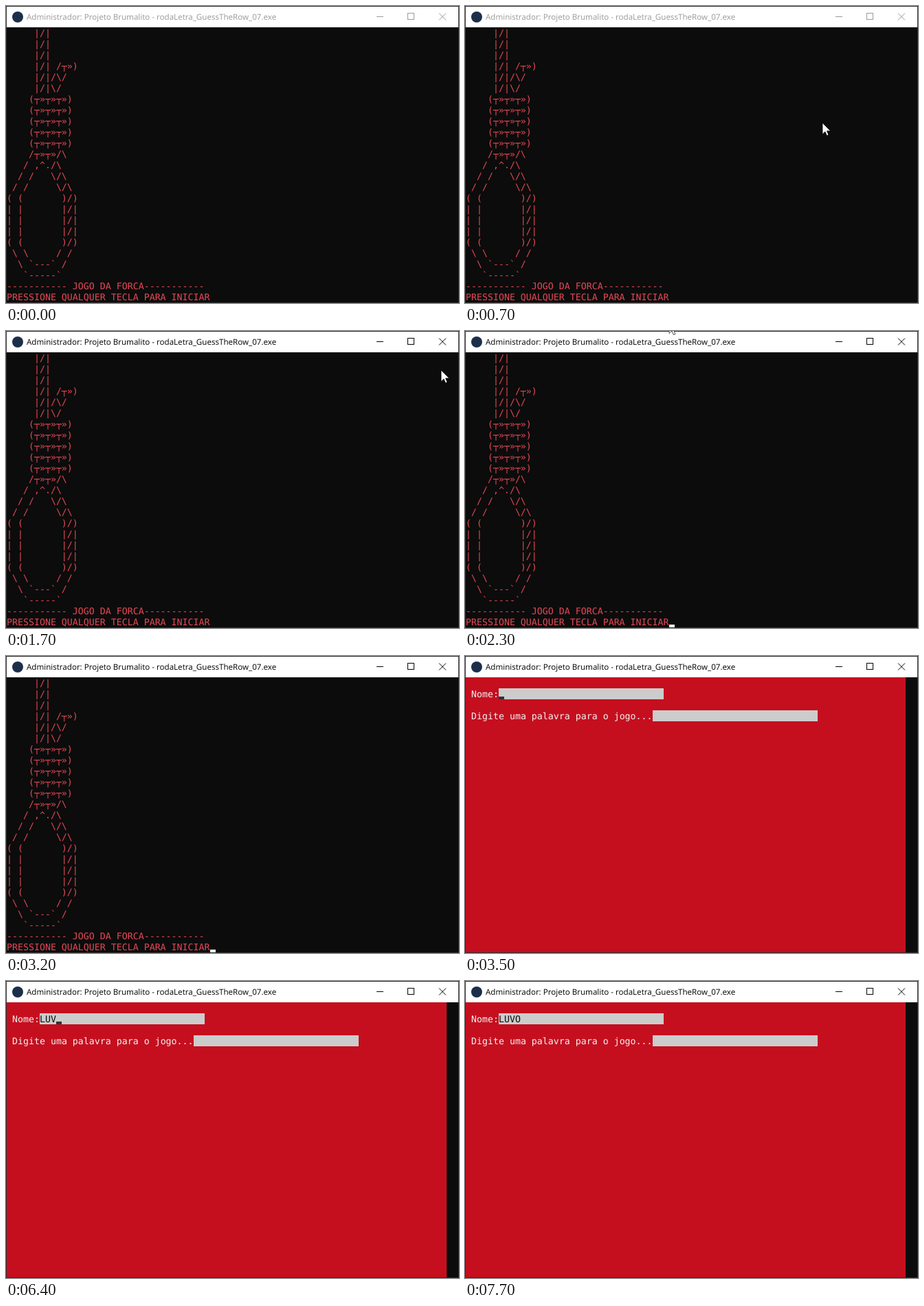
An HTML page that plays this animation: 659 by 432 pixels, repeating every 8 s.

```html
<!DOCTYPE html>
<html lang="pt">
<head>
<meta charset="utf-8">
<title>Jogo da forca</title>
<style>
  html, body { margin: 0; width: 100%; height: 100%; overflow: hidden; background: #0c0c0c; }
  svg { display: block; width: 659px; height: 432px; }
  text { white-space: pre; text-rendering: geometricPrecision; }
  .mono { font: 13.288px "DejaVu Sans Mono", monospace; }
  .title { font: 11.6px "Open Sans", "Noto Sans", sans-serif; }
</style>
</head>
<body>
<svg viewBox="0 0 659 432" xmlns="http://www.w3.org/2000/svg">
  <rect width="659" height="432" fill="#0c0c0c"/>

  <g id="intro" class="mono" fill="#e74856"></g>

  <g id="form" class="mono" fill="#f2f2f2">
    <rect x="1" y="31" width="640" height="400" fill="#c50f1f"/>
    <rect x="49" y="47" width="240" height="16" fill="#ccc"/>
    <rect x="273" y="79" width="240" height="16" fill="#ccc"/>
    <text x="9" y="60">Nome:</text>
    <text x="9" y="92">Digite uma palavra para o jogo...</text>
    <text id="typed" x="49" y="60" fill="#0c0c0c"></text>
  </g>

  <rect id="caret" width="8" height="4"/>

  <rect width="659" height="31" fill="#fff"/>
  <circle cx="17" cy="16" r="8" fill="#1c2f4a"/>
  <g id="bar">
    <text class="title" x="30" y="20">Administrador: Projeto Brumalito - rodaLetra_GuessTheRow_07.exe</text>
    <g fill="none" stroke="currentColor">
      <path d="M539 15.5h10M584.5 10.5h9v9h-9z" shape-rendering="crispEdges"/>
      <path d="M630 10.5l10 10M640 10.5l-10 10"/>
    </g>
  </g>
  <rect x=".5" y=".5" width="658" height="431" fill="none" stroke="#2b2b2b"/>

  <path id="mouse" d="M0 0V16.5L3.9 12.8 6.4 18.5 8.9 17.4 6.5 11.8H11.7Z" fill="#fff" stroke="#000" stroke-width=".7"/>
</svg>

<script>
const LOOP = 8000, CELL = 8, ROW = 16, TOP = 31;
const FORM_AT = 3500, FOCUS_AT = 1400;
const el = id => document.getElementById(id);
const repeat = (line, n) => Array(n).fill(line);

const rope = [
  ...repeat("     |/|", 3),
  "     |/| /┬»)",
  "     |/|/\\/",
  "     |/|\\/",
  ...repeat("    (┬»┬»┬»)", 5),
  "    /┬»┬»/\\",
  "   / ,^./\\",
  "  / /   \\/\\",
  " / /     \\/\\",
  "( (       )/)",
  ...repeat("| |       |/|", 3),
  "( (       )/)",
  " \\ \\     / /",
  "  \\ `---` /",
  "   `-----`",
  "----------- JOGO DA FORCA-----------",
  "PRESSIONE QUALQUER TECLA PARA INICIAR"
];

rope.forEach((line, row) => {
  const text = document.createElementNS("http://www.w3.org/2000/svg", "text");
  text.setAttribute("x", 1);
  text.setAttribute("y", TOP + row * ROW + 13);
  text.textContent = line;
  el("intro").append(text);
});

const NAME = "LUVO";
const keyTimes = [5000, 5200, 6400, 6900];
const NEXT_FIELD_AT = 7500;

// Intervals in which the caret is lit
const caretOn = [
  [2200, 2800], [3200, 3700], [4200, 4700], [5000, 5100], [5200, 5700],
  [6200, 6700], [6900, 7200], [7500, 7700]
];

// Pointer path: time, x, y
const path = [
  [300, 34, 0], [500, 260, 60], [700, 520, 170], [900, 639, 280], [1100, 626, 268],
  [1200, 605, 169], [1300, 605, 169], [1700, 633, 57], [2200, 297, -13], [2500, 296, -13]
];

function pointerAt(t) {
  const i = path.findIndex(p => p[0] > t);
  if (i < 1) return null;
  const [t0, x0, y0] = path[i - 1], [t1, x1, y1] = path[i];
  const k = (t - t0) / (t1 - t0);
  return [x0 + (x1 - x0) * k, y0 + (y1 - y0) * k].map(Math.round);
}

function caretCell(t, count) {
  if (t < FORM_AT) return [37, 24];
  return t < NEXT_FIELD_AT ? [6 + count, 1] : [34, 3];
}

const show = (node, on) => node.setAttribute("visibility", on ? "visible" : "hidden");

function draw(time) {
  const t = Math.floor(time % LOOP / 100) * 100;
  const inForm = t >= FORM_AT;
  const count = keyTimes.filter(k => t >= k).length;

  show(el("intro"), !inForm);
  show(el("form"), inForm);
  el("typed").textContent = NAME.slice(0, count);

  const ink = t < FOCUS_AT ? "#999" : "#000";
  el("bar").setAttribute("fill", ink);
  el("bar").setAttribute("color", ink);

  const caret = el("caret"), [col, row] = caretCell(t, count);
  show(caret, caretOn.some(([a, b]) => t >= a && t < b));
  caret.setAttribute("x", 1 + col * CELL);
  caret.setAttribute("y", TOP + row * ROW + 12);
  caret.setAttribute("fill", inForm ? "#333" : "#f3f3f3");

  const pos = pointerAt(t);
  show(el("mouse"), pos);
  if (pos) el("mouse").setAttribute("transform", `translate(${pos})`);
}

const start = performance.now();
function tick() {
  draw(performance.now() - start);
  requestAnimationFrame(tick);
}
tick();
</script>
</body>
</html>
```
